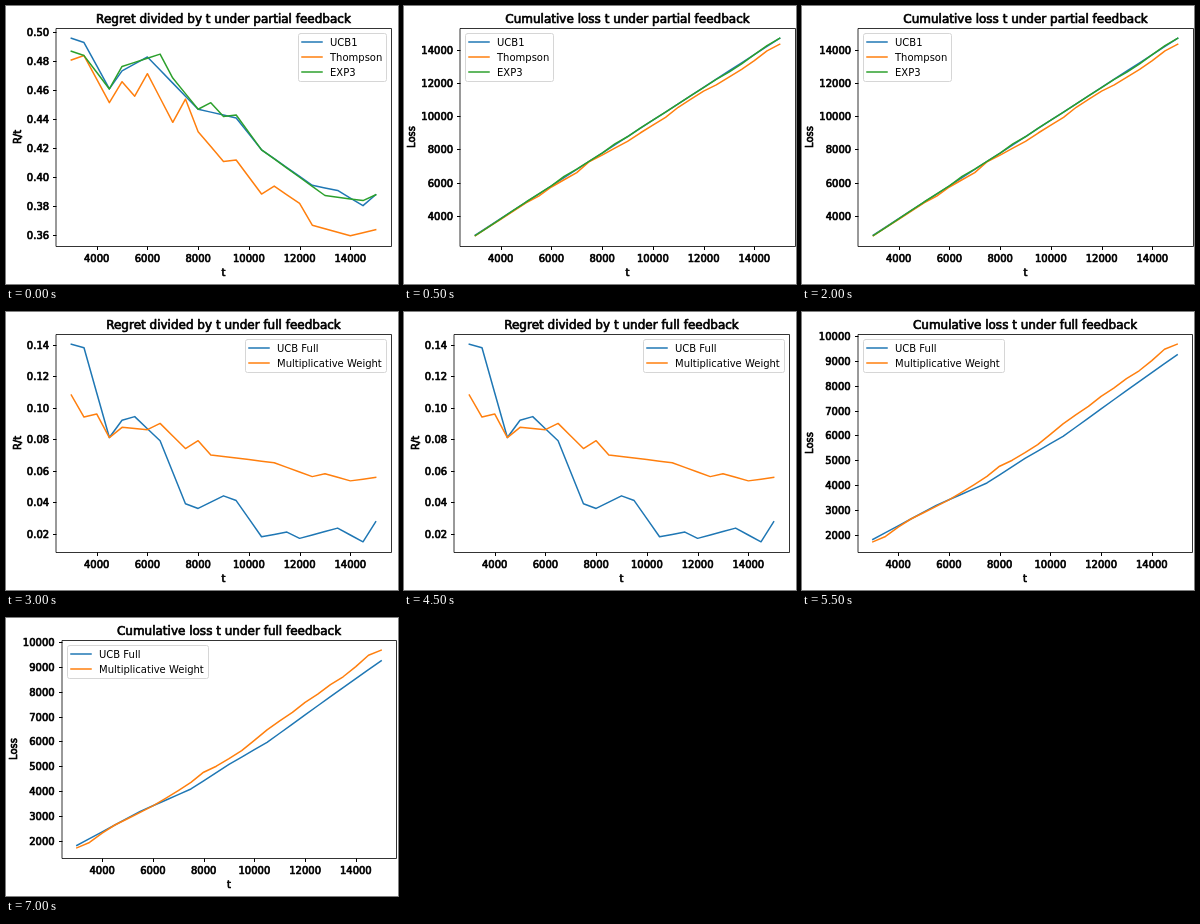
Recreate the animation shown at these times as an HTML page with a canvas. Size 392 by 278 pixels, loop 8000 ms.

```html
<!DOCTYPE html>
<html lang="en">
<head>
<meta charset="utf-8">
<style>
html, body { margin: 0; width: 100%; height: 100%; overflow: hidden; background: #fff; }
canvas { display: block; }
</style>
</head>
<body>
<canvas id="stage" width="392" height="278"></canvas>
<script>
const ctx = document.getElementById('stage').getContext('2d');
const FONT = '"DejaVu Sans", sans-serif';
const COLORS = ['#1f77b4', '#ff7f0e', '#2ca02c'];
const AXES = { top: 22.3, bottom: 239.7, width: 334.8 };
const LOOP = 8000;

// Time t is counted in thousands of rounds
const rounds = Array.from({ length: 25 }, (_, i) => 3 + i / 2);

// Straight segments through a few key points [t, value]
const through = (...keys) => t => {
  const i = Math.max(1, keys.findIndex(([keyT]) => keyT >= t));
  const [t0, v0] = keys[i - 1], [t1, v1] = keys[i];
  return v0 + (v1 - v0) * (t - t0) / (t1 - t0);
};

// Regret divided by t
const ucb1 = through([3, .496], [3.5, .493], [4.5, .461], [5, .4735], [6, .483], [8, .447],
  [9.5, .441], [10.5, .419], [12.5, .3945], [13.5, .391], [14.5, .3805], [15, .388]);
const thompson = through([3, .481], [3.5, .484], [4.5, .4515], [5, .466], [5.5, .456], [6, .4715],
  [7, .438], [7.5, .454], [8, .4315], [9, .411], [9.5, .412], [10.5, .3885], [11, .394],
  [12, .382], [12.5, .367], [14, .3597], [15, .364]);
const exp3 = through([3, .487], [3.5, .484], [4.5, .461], [5, .4765], [6.5, .485], [7, .4685],
  [8, .447], [8.5, .4515], [9, .442], [9.5, .443], [10.5, .419], [13, .3875], [14.5, .384], [15, .388]);
const ucbFull = through([3, .1403], [3.5, .138], [4.5, .081], [5, .092], [5.5, .0943], [6.5, .079],
  [7.5, .039], [8, .036], [9, .044], [9.5, .041], [10.5, .018], [11.5, .021], [12, .017],
  [13.5, .0235], [14.5, .0148], [15, .0275]);
const weights = through([3, .108], [3.5, .094], [4, .096], [4.5, .081], [5, .0875], [6, .086],
  [6.5, .09], [7.5, .074], [8, .079], [8.5, .07], [11, .065], [12.5, .0562], [13, .058],
  [14, .0535], [15, .0557]);

const partialLoss = t => 2860 + 985 * (t - 3);
const fullLoss = through([3, 1825], [5.5, 3190], [7.5, 4090], [9, 5080], [10.5, 5960], [13, 7800], [15, 9240]);

// Two losses differ by t times the gap in average regret
const lossOf = (base, baseRegret, regret) => t => base(t) + 1000 * t * (regret(t) - baseRegret(t));

const partialNames = ['UCB1', 'Thompson', 'EXP3'];
const fullNames = ['UCB Full', 'Multiplicative Weight'];
const regretLook = { label: 'R/t', labelX: 15, left: 50.1, step: .02, digits: 2, legendRight: true };
const lossLook = { label: 'Loss', labelX: 11, left: 56.1, digits: 0 };

const charts = [
  { ...regretLook, start: 0, title: 'Regret divided by t under partial feedback',
    names: partialNames, series: [ucb1, thompson, exp3] },
  { ...lossLook, start: 500, title: 'Cumulative loss t under partial feedback', step: 2000,
    names: partialNames,
    series: [partialLoss, lossOf(partialLoss, ucb1, thompson), lossOf(partialLoss, ucb1, exp3)] },
  { ...regretLook, start: 3000, title: 'Regret divided by t under full feedback',
    names: fullNames, series: [ucbFull, weights] },
  { ...lossLook, start: 5500, title: 'Cumulative loss t under full feedback', step: 1000, left: 55.6,
    names: fullNames, series: [fullLoss, lossOf(fullLoss, ucbFull, weights)] }
];

const snap = v => Math.round(v) + .5;

function line(points, color, width, cap = 'butt') {
  ctx.strokeStyle = color;
  ctx.lineWidth = width;
  ctx.lineCap = cap;
  ctx.beginPath();
  points.forEach(([x, y]) => ctx.lineTo(x, y));
  ctx.stroke();
}

// Text outside the axes has a heavy, hard edge
function heavyText(text, x, y, align = 'center', size = 10) {
  ctx.font = `${size}px ${FONT}`;
  ctx.textAlign = align;
  ctx.fillStyle = ctx.strokeStyle = '#000';
  ctx.lineWidth = .7;
  ctx.fillText(text, x, y);
  ctx.strokeText(text, x, y);
}

function drawLegend({ names, left, legendRight }) {
  ctx.font = `10px ${FONT}`;
  ctx.textAlign = 'left';
  const width = 36 + Math.max(...names.map(n => ctx.measureText(n).width));
  const x = Math.round(legendRight ? left + AXES.width - 5 - width : left + 5);
  ctx.beginPath();
  ctx.roundRect(x + .5, 27.5, Math.round(width), Math.round(4 + 14.7 * names.length), 2);
  ctx.fillStyle = 'rgba(255,255,255,.8)';
  ctx.fill();
  ctx.strokeStyle = '#d6d6d6';
  ctx.lineWidth = 1;
  ctx.stroke();
  names.forEach((name, i) => {
    const y = 36 + 15 * i;
    line([[x + 4, y], [x + 24, y]], COLORS[i], 1.5, 'square');
    ctx.fillStyle = '#000';
    ctx.fillText(name, x + 32, y + 4);
  });
}

function drawChart(chart) {
  const { left, step, digits } = chart;
  const { top, bottom, width } = AXES;
  const height = bottom - top;
  const curves = chart.series.map(valueAt => rounds.map(valueAt));
  const low = Math.min(...curves.flat()), high = Math.max(...curves.flat());

  // The data keeps a margin of 1/22 of the axes on each side
  const xOf = t => left + width * (1 / 22 + (t - 3) / 12 / 1.1);
  const yOf = v => bottom - height * (1 / 22 + (v - low) / (high - low) / 1.1);
  const x0 = snap(left), x1 = snap(left + width), y0 = snap(top), y1 = snap(bottom);

  ctx.fillStyle = '#fff';
  ctx.fillRect(0, 0, 392, 278);
  ctx.lineJoin = 'round';

  for (let t = 4; t <= 14; t += 2) {
    const x = snap(xOf(t));
    line([[x, y1], [x, y1 + 3.5]], '#000', 1);
    heavyText(t * 1000, xOf(t), 256);
  }
  for (let n = Math.ceil(low / step); yOf(n * step) > top; n++) {
    const y = yOf(n * step);
    line([[x0 - 3.5, snap(y)], [x0, snap(y)]], '#000', 1);
    heavyText((n * step).toFixed(digits), left - 7, Math.round(y) + 4, 'right');
  }

  curves.forEach((values, i) =>
    line(values.map((v, k) => [xOf(rounds[k]), yOf(v)]), COLORS[i], 1.5, 'square'));

  ctx.strokeStyle = '#000';
  ctx.lineWidth = .8;
  ctx.strokeRect(x0, y0, x1 - x0, y1 - y0);

  const middle = left + width / 2;
  heavyText(chart.title, middle, 17, 'center', 12);
  heavyText('t', middle, 270);
  ctx.save();
  ctx.translate(chart.labelX, (top + bottom) / 2);
  ctx.rotate(-Math.PI / 2);
  heavyText(chart.label, 0, 0);
  ctx.restore();

  drawLegend(chart);
}

const origin = performance.now();
function frame() {
  const time = (performance.now() - origin) % LOOP;
  drawChart(charts.findLast(c => c.start <= time));
  requestAnimationFrame(frame);
}
frame();
</script>
</body>
</html>
```
